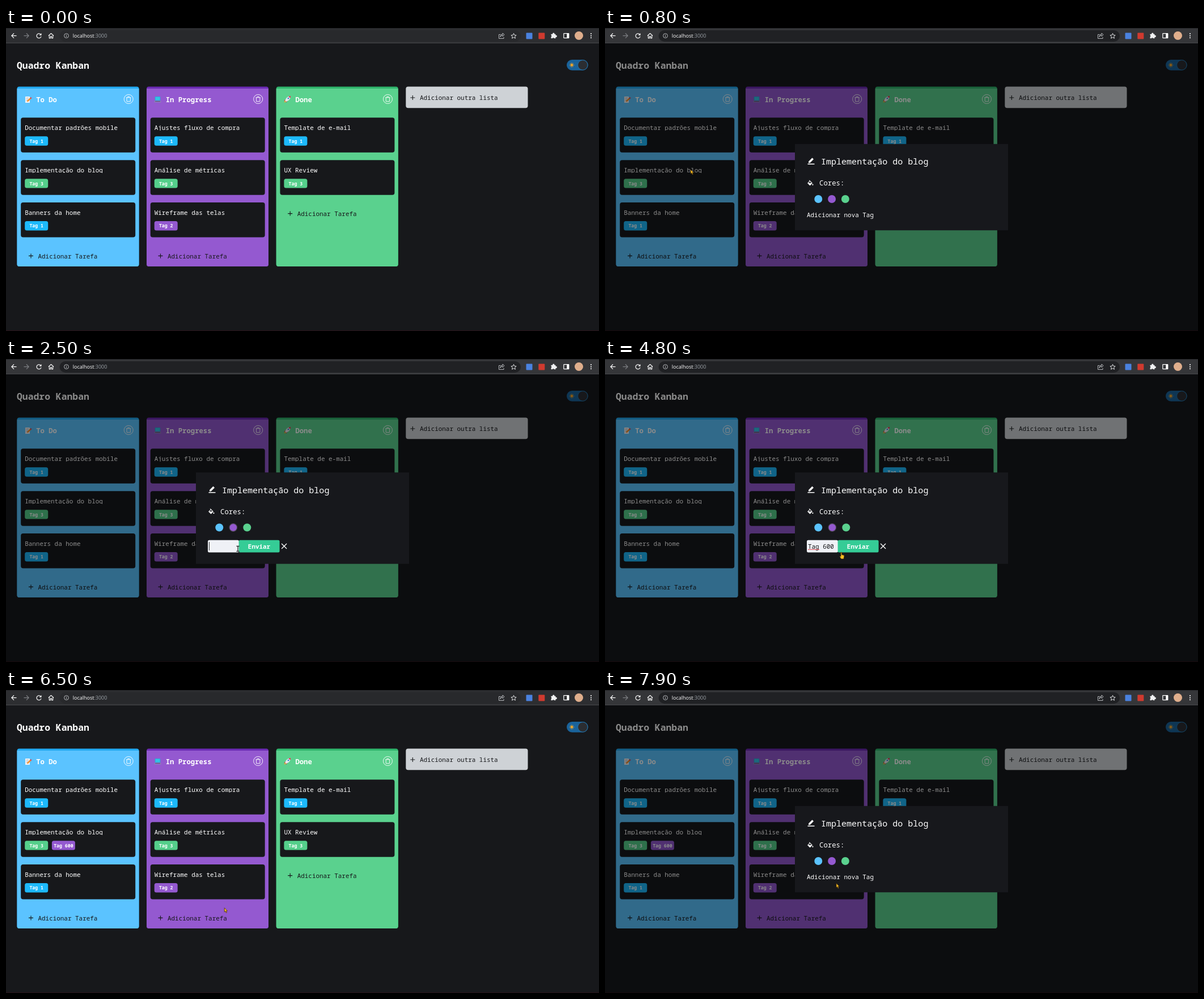
An HTML page that plays this animation: 1046x535 px, repeating every 8000 ms.

```html
<!DOCTYPE html>
<html lang="pt">
<head>
<meta charset="utf-8">
<title>Quadro Kanban</title>
<style>
  html, body { margin: 0; width: 100%; height: 100%; overflow: hidden; background: #17181b; }
  svg { display: block; width: 100vw; height: 100vh; }
  text { font-family: "Noto Sans Mono", "DejaVu Sans Mono", monospace; white-space: pre; }
  .url { font-family: "Open Sans", "Noto Sans", sans-serif; }
</style>
</head>
<body>
<svg id="stage" viewBox="0 0 1046 535"></svg>
<script>
const LOOP = 8000, STEP = 100;
const INK = '#17181b', BLUE = '#5bc3ff', PURPLE = '#9459d0', GREEN = '#5ad18e';
const TAG_COLORS = { 'Tag 1': '#1db9fb', 'Tag 2': PURPLE, 'Tag 3': '#55cf8b', 'Tag 600': PURPLE };
const BODY = 10.93;

const rect = (x, y, w, h, fill, r = 0, extra = '') =>
  `<rect x="${x}" y="${y}" width="${w}" height="${h}" rx="${r}" fill="${fill}" ${extra}/>`;
const circle = (x, y, r, fill, extra = '') =>
  `<circle cx="${x}" cy="${y}" r="${r}" fill="${fill}" ${extra}/>`;
const text = (x, y, str, size = BODY, fill = '#fff', weight = 400, extra = '') =>
  `<text x="${x}" y="${y}" font-size="${size}" font-weight="${weight}" fill="${fill}" ${extra}>${str}</text>`;
const line = (d, color = '#fff', width = 1.2) =>
  `<path d="${d}" fill="none" stroke="${color}" stroke-width="${width}" stroke-linejoin="round"/>`;
const shape = (d, fill) => `<path d="${d}" fill="${fill}"/>`;
const at = (x, y, inner) => `<g transform="translate(${x} ${y})">${inner}</g>`;

const plus = (x, y) => at(x, y, line('M-4 0H4M0-4V4', INK, 1.1));
const trash = (x, y, width) => at(x, y,
  circle(0, 0, 8, 'none', `stroke="#fff" stroke-width="${width}"`) +
  line('M-4.3-2.7H4.3M-1.5-2.9V-4.2H1.5V-2.9M-3.2-2.5V4.2H3.2V-2.5', '#fff', width));

const emoji = {
  memo: shape('M-5-5H3V6H-5Z', '#f1f1f4') +
    line('M-3.5-2.5H1M-3.5 0H0M-3.5 2.5H-1', '#9aa7b5', .7) +
    line('M-1.5 3.5L4.5-2', '#f4902c', 2.4) + line('M4.1-1.7L5.8-3.2', '#d9415d', 2.4),
  laptop: rect(-4.8, -5, 9.6, 7.2, '#2aa9d8', .8) + rect(-3.8, -4, 7.6, 5.4, '#35c2e4') +
    shape('M-5 2.4H5L6.5 5.2H-6.5Z', '#8d83b8') + shape('M-4.2 3H4.2L4.7 4H-4.7Z', '#5a5475'),
  rocket: shape('M-3.5 0L-6 3L-2.5 2.2ZM0 3.5L-2.6 6L-1.8 2.4Z', '#e0344f') +
    shape('M6-6Q1-5.6-2-1.8L-4 2L-2 4L2 2Q5.6-1 6-6Z', '#e7e9ee') +
    shape('M6-6Q3.5-5.8 2.2-5L5-2.2Q5.9-3.6 6-6Z', '#e0344f') +
    circle(1.8, -1.8, 1.4, '#3b8bd0') + shape('M-4 2.2L-6 6L-2.2 4Z', '#f7a928')
};

const columns = [
  { x: 19.5, title: 'To Do', icon: 'memo', fill: BLUE, edge: '#23aaf2', cards: [
    ['Documentar padrões mobile', 'Tag 1'], ['Implementação do blog', 'Tag 3'], ['Banners da home', 'Tag 1']] },
  { x: 248, title: 'In Progress', icon: 'laptop', fill: PURPLE, edge: '#6c2bb5', cards: [
    ['Ajustes fluxo de compra', 'Tag 1'], ['Análise de métricas', 'Tag 3'], ['Wireframe das telas', 'Tag 2']] },
  { x: 476.7, title: 'Done', icon: 'rocket', fill: GREEN, edge: '#2fb56d', cards: [
    ['Template de e-mail', 'Tag 1'], ['UX Review', 'Tag 3']] }
];

function tag(x, y, label) {
  return rect(x, y, 41, 16.4, TAG_COLORS[label], 3.5) +
    text(x + 20.5, y + 11.3, label, 8.2, '#fff', 700, 'text-anchor="middle"');
}

function card(x, y, title, tags, pointer) {
  const hover = pointer && pointer.x > x && pointer.x < x + 202 && pointer.y > y && pointer.y < y + 61.5;
  const tagY = y + 33 + (hover ? 4 : 0);
  return rect(x, y, 202, 61.5, INK, 4) +
    text(x + 7, y + 22, title) +
    rect(x + 5, y + 22.8, 180, 5, INK) +  // titles are cut just under the baseline
    tags.map((label, i) => tag(x + 7 + i * 47.7, tagY, label)).join('') +
    (hover ? trash(x + 186.3, y + 18.7, 1.3) : '');
}

function column({ x, title, icon, fill, edge, cards }, extraTag, pointer) {
  const addY = 178 + cards.length * 74.8;
  return rect(x, 103.5, 215, 317.5, edge, 4) +
    shape(`M${x} 107H${x + 215}V417Q${x + 215} 421 ${x + 211} 421H${x + 4}Q${x} 421 ${x} 417Z`, fill) +
    at(x + 19.5, 126, emoji[icon]) +
    text(x + 33.7, 130.6, title, 12.26, '#fff', 700) +
    trash(x + 196.7, 125.5, .9) +
    cards.map(([name, label], i) => card(x + 6.7, 158.3 + i * 74.9, name,
      extraTag && name.startsWith('Impl') ? [label, 'Tag 600'] : [label], pointer)).join('') +
    plus(x + 24.5, addY) + text(x + 37, addY + 4.2, 'Adicionar Tarefa', BODY, INK);
}

function browserBar(dim) {
  const soft = '#c5c7ca';
  const puzzle = 'M-4.5-2.5H-1.8A1.7 1.7 0 1 1 1.4-2.5H3.5V-.4A1.7 1.7 0 1 1 3.5 2.7V5H.8A1.5 1.5 0 0 0-2 5H-4.5V2.2A1.5 1.5 0 0 0-4.5-.5Z';
  return rect(0, 0, 1046, 26, dim ? '#353639' : '#2d2e31') + rect(0, 0, 1046, 1, '#202124') +
    rect(0, 26, 1046, 1, '#48494c') +
    rect(94.5, 4, 813.5, 20, dim ? '#202124' : '#28292c', 10) +
    at(14, 13.7, line('M4.5 0H-4M0-4.2L-4.2 0L0 4.2')) +
    at(36, 13.7, line('M-4.5 0H4M0-4.2L4.2 0L0 4.2', '#7d7f83')) +
    at(58, 13.7, line('M3.2-2.3A4 4 0 1 0 4 1.1') + shape('M4.5-4.6V-.8H.7Z', '#fff')) +
    at(79.5, 13.7, line('M-4.6 0L0-4.2L4.6 0M-3.2-.8V4.2H-1V1.2H1V4.2H3.2V-.8', '#fff', 1.1)) +
    at(106.5, 13.7, circle(0, 0, 3.9, 'none', `stroke="${soft}" stroke-width=".9"`) +
      line('M0-.5V2.2M0-2.2V-1.2', soft, .9)) +
    `<text class="url" x="117.7" y="17" font-size="9" fill="#fff">localhost<tspan fill="#9aa0a6">:3000</tspan></text>` +
    at(874, 14, line('M-1.5-2.5H-4.5V4.5H4V2M-2 2Q-1.5-1.5 2-1.5V.8L5-2.2L2-5V-3Q-2-2.6-2 2', soft, .9)) +
    at(895.5, 14, line('M0-4.6L1.3-1.5L4.6-1.2L2.1 1L2.9 4.3L0 2.5L-2.9 4.3L-2.1 1L-4.6-1.2L-1.3-1.5Z', '#e0e1e3', 1)) +
    rect(917.5, 8.5, 11, 11, '#4a82e0', 1) + rect(939.3, 8.5, 11, 11, '#cf3a2f', 1) +
    at(966, 13.3, shape(puzzle, '#f1f2f3')) +
    at(988.3, 13.7, rect(-4.5, -4, 9, 8, 'none', .5, 'stroke="#fff" stroke-width="1.2"') + rect(1, -4, 3.5, 8, '#fff')) +
    circle(1010.5, 13.5, 7.5, '#dfae8c') +
    [-3.6, 0, 3.6].map(d => circle(1032, 13.7 + d, 1.05, '#fff')).join('');
}

function board(extraTag, pointer) {
  const rays = [...Array(8).keys()].map(i => {
    const c = Math.cos(i * Math.PI / 4), s = Math.sin(i * Math.PI / 4);
    return `M${c * 2.8} ${s * 2.8}L${c * 4.2} ${s * 4.2}`;
  }).join('');
  return rect(0, 27, 1046, 508, INK) +
    text(19, 71.6, 'Quadro Kanban', 16.4, '#fff', 600) +
    rect(989, 56, 37.7, 18.8, '#1a639b', 9.4) +
    at(998, 65.4, circle(0, 0, 2.3, '#f9a826') + line(rays, '#f9a826', 1)) +
    circle(1017.3, 65.4, 8.7, '#2b2d31', 'stroke="#277bb5" stroke-width=".8"') +
    columns.map(c => column(c, extraTag, pointer)).join('') +
    rect(705.3, 103.5, 215.2, 37.8, '#ced2d6', 4) + plus(717.3, 123) +
    text(730, 127.2, 'Adicionar outra lista', BODY, INK) +
    rect(0, 534, 1046, 1, '#2a1219');
}

// Typing schedule: one time per typed character.
const keyTimes = [3200, 3300, 3400, 3700, 4000, 4100, 4300];

function tagForm(t) {
  const typed = 'Tag 600'.slice(0, keyTimes.filter(k => k <= t).length);
  const lastKey = [2500, ...keyTimes].filter(k => k <= t).pop();
  const caretX = 358.5 + typed.length * 6.56;
  let wave = 'M358 337';
  for (let x = 358; x < 377; x += 2) wave += 'l1-1.2l1 1.2';
  return rect(356, 319.8, 55, 21.6, '#eff1f6', 2.5) +
    text(358, 334.8, typed, BODY, INK) +
    (typed.length > 3 ? line(wave, '#e0303c', .8) : '') +
    ((t - lastKey) % 1000 < 500 ? rect(caretX - .4, 323, .9, 15, INK) : '') +
    rect(410.6, 319.8, 72, 21.6, '#35cc96', 2.5) +
    text(446.5, 334.8, 'Enviar', BODY, '#fff', 700, 'text-anchor="middle"') +
    at(490.6, 330.5, line('M-4.5-4.5L4.5 4.5M4.5-4.5L-4.5 4.5', '#fff', 1.3));
}

function modal(t) {
  const chosen = t >= 2000 && t < 5800, form = t >= 2500 && t < 5800;
  const grow = form ? 4.5 : chosen ? .6 : 0;
  const gap = chosen ? 24.5 : 23.8;
  const dots = [BLUE, PURPLE, GREEN].map((fill, i) => chosen && i === 1
    ? circle(376.3 + gap, 302, 6.8, fill, 'stroke="#4c4753" stroke-width="1.2"')
    : circle(376.3 + gap * i, 302, 7, fill)).join('');
  return rect(335, 204.8 - grow, 376, 152.4 + grow * 2, '#17181c') + at(0, -grow,
    at(363.5, 235, shape('M-4.5 3.2V.7L2-5.8L4.5-3.3L-2 3.2Z', '#fff') + rect(-6, 4.5, 12, 1.5, '#fff')) +
    text(381, 241, 'Implementação do blog', 15.04) +
    at(362, 273.5, line('M-1.8-4.6L3.2.3L-.5 4L-4.2.3L-.4-3.4', '#fff', 1.1) +
      shape('M-4 .3H3L-.5 4Z', '#fff') + circle(4.4, 3.2, 1.1, '#fff')) +
    text(378, 278, 'Cores:', 12.3) + dots +
    (form ? '' : text(356, 333.8, 'Adicionar nova Tag'))) +
    (form ? tagForm(t) : '');
}

// [time, x, y, kind]; the kind holds until the next key.
const path = [
  [100, 168, 36, 'arrow'], [600, 151, 250, 'arrow'], [800, 151, 250, 'arrow'], [1400, 407, 301, 'hand'],
  [1500, 407, 301, 'hand'], [1800, 402, 294, 'hand'], [1900, 402, 294, 'hand'], [2300, 408, 333, 'hand'],
  [2500, 409, 335, 'beam'], [4700, 409, 335, 'beam'], [4800, 417, 341.5, 'hand'], [5000, 437, 343, 'hand'],
  [5200, 437, 343, 'hand'], [5600, 460, 336, 'hand'], [5700, 460, 336, 'hand'], [6000, 439, 340, 'arrow'],
  [6100, 439, 340, 'arrow'], [6300, 408, 393, 'arrow'], [6400, 408, 393, 'arrow'], [7000, 101, 280.5, 'arrow'],
  [7300, 101, 280.5, 'arrow'], [7400, 106, 287, 'arrow'], [7500, 106, 287, 'arrow'], [7900, 408, 341.5, 'arrow']
];

function pointerAt(t) {
  const i = path.findLastIndex(key => key[0] <= t);
  if (i < 0) return null;
  const [t0, x0, y0, kind] = path[i];
  const [t1, x1, y1] = path[i + 1] || [t0 + 1, x0, y0];
  const p = Math.min(1, (t - t0) / (t1 - t0)), e = p * p * (3 - 2 * p);
  return { x: x0 + (x1 - x0) * e, y: y0 + (y1 - y0) * e, kind };
}

const outlined = d => `<path d="${d}" fill="#f8bd22" stroke="#3a2608" stroke-width=".7" stroke-linejoin="round"/>`;
const cursors = {
  arrow: outlined('M0 0V7.3L1.7 5.8L3 8.8L4.3 8.2L3.1 5.3H5.3Z'),
  hand: outlined('M-1 0Q0-.7 .7 .3V4L4.4 5Q5.2 5.4 4.9 7L4 11.5H-.6L-3 7.3Q-2.8 6-1 7Z'),
  beam: line('M-2.5-4.5H-.5L0-4L.5-4.5H2.5M0-4V4M-2.5 4.5H-.5L0 4L.5 4.5H2.5', '#2c2c2c', 1.3)
};

function render(t) {
  const open = (t >= 800 && t < 6500) || t >= 7600;
  const pointer = pointerAt(t);
  return board(t >= 5800, open ? null : pointer) +
    (open ? rect(0, 27, 1046, 508, '#000', 0, 'opacity=".46"') + modal(t) : '') +
    browserBar(open) +
    (pointer ? at(pointer.x, pointer.y, cursors[pointer.kind]) : '');
}

const stage = document.getElementById('stage');
const start = performance.now();
let shown = -1;
function tick() {
  const t = Math.floor((performance.now() - start) % LOOP / STEP) * STEP;
  if (t !== shown) stage.innerHTML = render(shown = t);
  requestAnimationFrame(tick);
}
tick();
</script>
</body>
</html>
```
